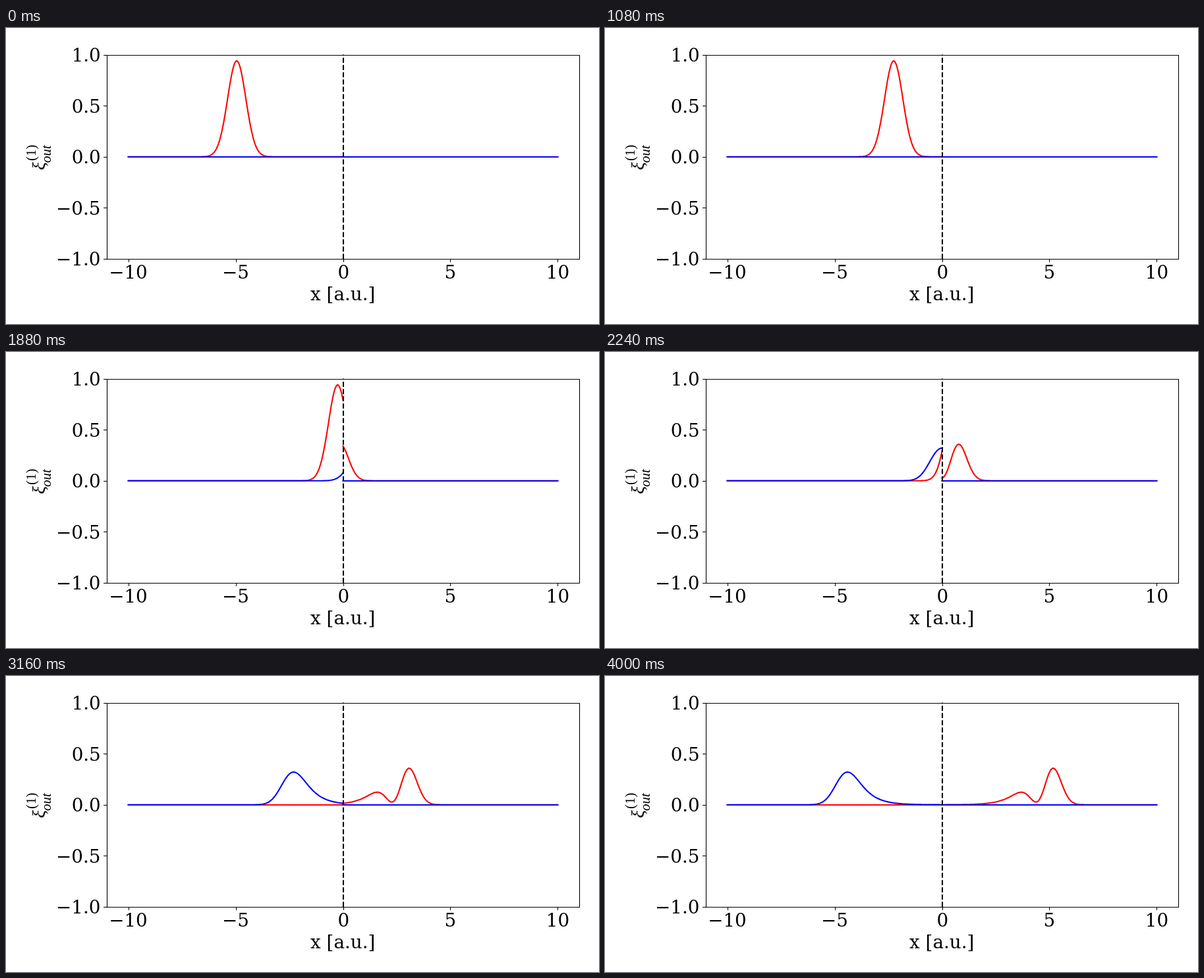
Animation of 900x450 px, one loop 4020 ms. Source, as an HTML page:

```html
<!DOCTYPE html>
<html lang="en">
<head>
<meta charset="utf-8">
<title>Photon pulse scattering</title>
<style>
  html, body { margin: 0; width: 100%; height: 100%; overflow: hidden; background: #fff; }
  svg { display: block; }
  text { font-family: "DejaVu Serif", "Noto Serif", serif; font-size: 27.78px; }
  .math text { font-family: "Liberation Serif", serif; font-size: 21px; }
  .math .slanted { font-style: italic; }
  .curve { fill: none; stroke-width: 2.08; stroke-linecap: square; stroke-linejoin: round; }
  .axis { fill: none; stroke: #000; stroke-width: 1.11; }
</style>
</head>
<body>
<svg id="stage" width="900" height="450" viewBox="0 0 900 450">
  <rect width="900" height="450" fill="#fff"/>
  <g id="curves"></g>
  <path d="M512 351V40.5" stroke="#000" stroke-width="2.08" stroke-dasharray="7.71 3.33"/>
  <path class="axis" d="M153.5 41.5H870.5V351.5H153.5Z"/>
  <g id="ticks"></g>
  <text x="511.2" y="414" text-anchor="middle">x [a.u.]</text>
  <g class="math">
    <text class="slanted" transform="translate(59 216) rotate(-90)" style="font-size:28px">ξ</text>
    <text transform="translate(44.5 202) rotate(-90)">(1)</text>
    <text class="slanted" transform="translate(68 205) rotate(-90)">out</text>
  </g>
</svg>
<script>
const FRAME_MS = 20, FRAMES = 201;
const CENTER_X = 511.5, UNIT_X = 717 / 22, ZERO_Y = 195.75, UNIT_Y = 155.25;
const FLAT_Y = 196;            // an all-zero curve sits on whole pixels
const STEP = 0.05, START = STEP - 5;
const HALF_RATE = 0.83, DETUNING = 0.47;

const make = (parent, tag, attrs, text = "") => {
  const node = document.createElementNS("http://www.w3.org/2000/svg", tag);
  for (const key in attrs) node.setAttribute(key, attrs[key]);
  node.textContent = text;
  return parent.appendChild(node);
};

// Gaussian photon with unit norm and a full width at half maximum of 1
const pulse = tau =>
  Math.sqrt(2) * (Math.LN2 / Math.PI) ** 0.25 * Math.exp(-2 * Math.LN2 * tau * tau);

// Field re-emitted by the detuned emitter: e' = -(rate + i detuning) e + rate * pulse
const TAU_MIN = -5, TAU_MAX = 16, DT = 0.005;
const emitted = [];
{
  const decay = Math.exp(-HALF_RATE * DT), half = Math.exp(-HALF_RATE * DT / 2);
  const turn = DETUNING * DT;
  const cos = Math.cos(turn), sin = Math.sin(turn);
  let re = 0, im = 0;
  for (let i = 0; i <= (TAU_MAX - TAU_MIN) / DT; i++) {
    emitted.push([re, im]);
    const gain = HALF_RATE * DT * half * pulse(TAU_MIN + (i + 0.5) * DT);
    [re, im] = [
      decay * (re * cos + im * sin) + gain * Math.cos(turn / 2),
      decay * (im * cos - re * sin) - gain * Math.sin(turn / 2)
    ];
  }
}
const emittedAt = tau => {
  const pos = (tau - TAU_MIN) / DT;
  if (pos <= 0) return [0, 0];
  const i = Math.min(Math.floor(pos), emitted.length - 2), f = pos - i;
  return [0, 1].map(k => emitted[i][k] * (1 - f) + emitted[i + 1][k] * f);
};

const incoming = tau => pulse(tau) ** 2;
const reflected = tau => {
  const [re, im] = emittedAt(tau);
  return re * re + im * im;
};
const transmitted = tau => {
  const [re, im] = emittedAt(tau);
  return (pulse(tau) - re) ** 2 + im * im;
};

// Outgoing fields trail the incoming one by a single time step
const curves = document.getElementById("curves");
const addCurve = (stroke, from, value) =>
  ({ node: make(curves, "path", { class: "curve", stroke }), from, value });
const lines = [
  addCurve("#f00", -10, (x, c) => incoming(c - x)),
  addCurve("#f00", 0, (x, c) => transmitted(c - STEP - x)),
  addCurve("#00f", -10, (x, c) => reflected(c - STEP + x)),
  addCurve("#00f", 0, () => 0)
];

const px = x => CENTER_X + UNIT_X * x;
const py = y => ZERO_Y - UNIT_Y * y;

function trace({ node, from, value }, center) {
  const points = [];
  let peak = 0;
  for (let i = 0; i <= 200; i++) {
    const x = from + i * 0.05, y = value(x, center);
    peak = Math.max(peak, y);
    points.push(px(x).toFixed(2) + " " + py(y).toFixed(2));
  }
  node.setAttribute("d", peak < 4e-6
    ? `M${px(from)} ${FLAT_Y}H${px(from + 10)}`
    : "M" + points.join("L"));
}

const ticks = document.getElementById("ticks");
const snap = v => Math.round(v) + 0.5;
const label = v => String(v).replace("-", "\u2212");
for (let i = -2; i <= 2; i++) {
  const x = snap(px(i * 5)), y = snap(py(i / 2));
  make(ticks, "path", { class: "axis", d: `M${x} 351v4.9` });
  make(ticks, "path", { class: "axis", d: `M153 ${y}h-4.9` });

  // the side bearing of the minus sign pulls negative labels to the left
  make(ticks, "text", { x: x - (i < 0 ? 1 : 0.1), y: 381.3, "text-anchor": "middle" },
    label(i * 5));
  make(ticks, "text", { x: i < 0 ? 143.4 : 143.8, y: py(i / 2) + 10.45, "text-anchor": "end" },
    label((i / 2).toFixed(1)));
}

const begin = performance.now();
let shown = -1;
function draw(now) {
  const frame = Math.floor(Math.max(0, now - begin) / FRAME_MS) % FRAMES;
  if (frame !== shown) {
    shown = frame;
    lines.forEach(line => trace(line, START + STEP * frame));
  }
  requestAnimationFrame(draw);
}
draw(begin);
</script>
</body>
</html>
```
